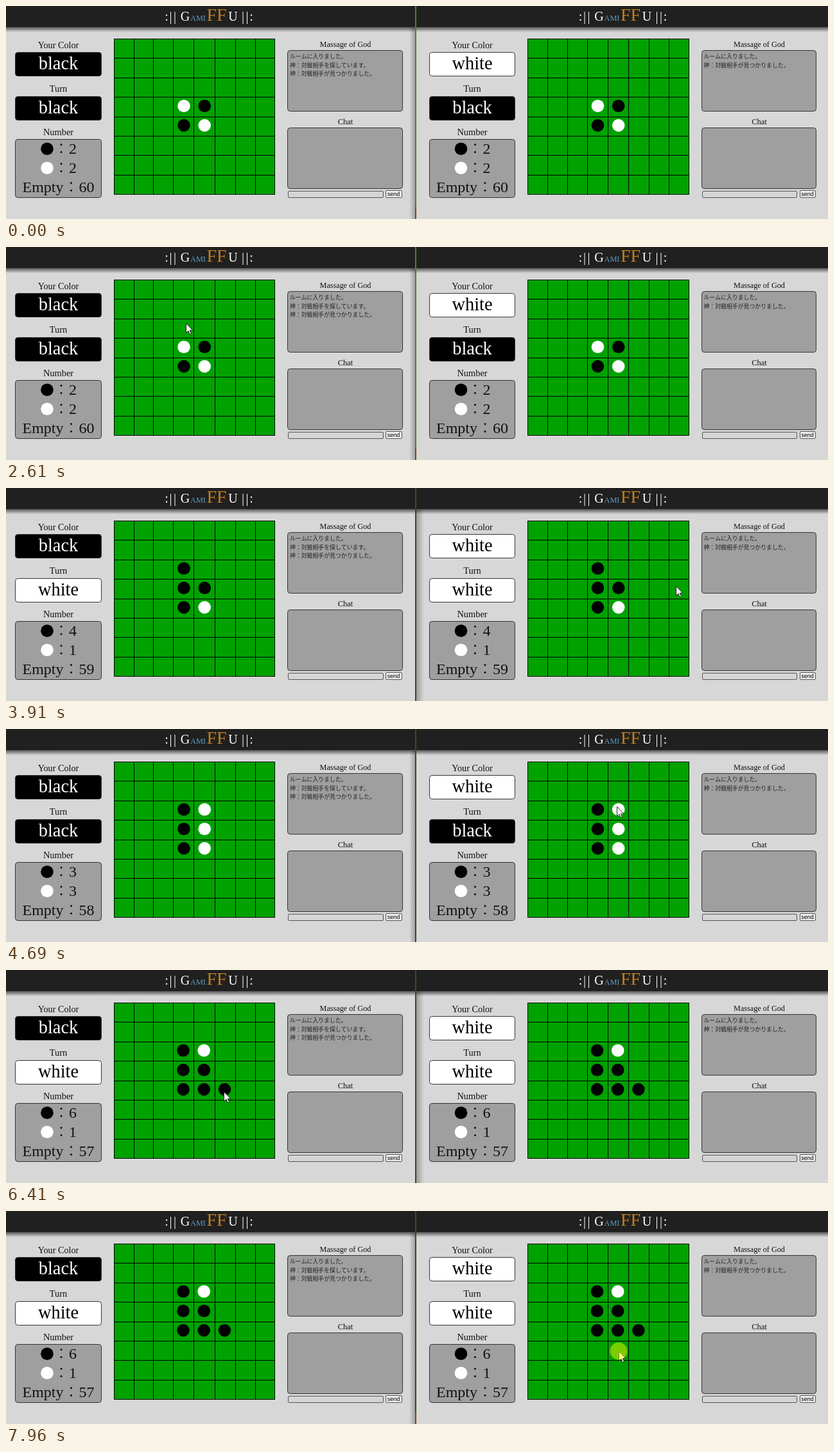
Recreate the animation shown at these times as an HTML page with a canvas. Size 1280x333 px, loop 8000 ms.

```html
<!DOCTYPE html>
<html lang="ja">
<head>
<meta charset="utf-8">
<style>
  html, body { margin: 0; width: 100%; height: 100%; overflow: hidden; background: #d7d7d7; }
  canvas { display: block; }
</style>
</head>
<body>
<canvas id="stage" width="1280" height="333"></canvas>
<script>
const ctx = document.getElementById('stage').getContext('2d');
const LOOP = 8000;
const STEP = 77;
const SERIF = '"Liberation Serif", "Noto Serif CJK JP", "Noto Sans CJK JP", serif';
const SANS = '"Noto Sans CJK JP", "Noto Sans CJK", sans-serif';

// Each click puts a disc on the board a moment later.
const plays = [
  { click: 2920, placed: 2990, color: 'black', col: 3, row: 2 },
  { click: 4630, placed: 4690, color: 'white', col: 4, row: 2 },
  { click: 6350, placed: 6410, color: 'black', col: 5, row: 4 },
  { click: 7960, placed: LOOP, color: 'white', col: 4, row: 5 },
];

// Cursor stops; each glide starts where the last one ended.
const entry = { x: 218, y: 333 };
const glides = [
  { start: 1470, end: 2220, x: 249, y: 125 },
  { start: 2300, end: 2610, x: 280, y: 119 },
  { start: 3300, end: 3760, x: 1060, y: 159 },
  { start: 3840, end: 4380, x: 951, y: 121 },
  { start: 5010, end: 5850, x: 335, y: 181 },
  { start: 5930, end: 6180, x: 339, y: 190 },
  { start: 6580, end: 6650, x: 350, y: 167 },
  { start: 6730, end: 7340, x: 944, y: 225 },
  { start: 7410, end: 7570, x: 954, y: 219 },
];

const other = color => color === 'black' ? 'white' : 'black';

function place(cells, { color, col, row }) {
  cells[row][col] = color;
  for (let dx = -1; dx <= 1; dx++) for (let dy = -1; dy <= 1; dy++) {
    const at = n => cells[row + dy * n]?.[col + dx * n];
    let n = 1;
    while (at(n) === other(color)) n++;
    if (at(n) === color) while (--n > 0) cells[row + dy * n][col + dx * n] = color;
  }
}

function gameAt(t) {
  const cells = Array.from({ length: 8 }, () => Array(8).fill(null));
  cells[3][3] = cells[4][4] = 'white';
  cells[3][4] = cells[4][3] = 'black';
  let turn = 'black';
  for (const play of plays.filter(p => t >= p.placed)) {
    place(cells, play);
    turn = other(play.color);
  }
  return { cells, turn };
}

function text(str, x, y, size, color = '#111', align = 'center', family = SERIF) {
  ctx.font = `${size}px ${family}`;
  ctx.fillStyle = color;
  ctx.textAlign = align;
  ctx.fillText(str, x, y);
}

function box(x, y, right, bottom, fill, radius = 4, border = '#333') {
  const left = Math.round(x);
  ctx.beginPath();
  ctx.roundRect(left + .5, y + .5, Math.floor(right) - left, bottom - y, radius);
  ctx.fillStyle = fill;
  ctx.fill();
  ctx.strokeStyle = border;
  ctx.lineWidth = 1;
  ctx.stroke();
}

function disc(x, y, color, radius = 9.8) {
  ctx.beginPath();
  ctx.arc(x, y, radius, 0, Math.PI * 2);
  ctx.fillStyle = color;
  ctx.fill();
}

function shade(x0, y0, x1, y1, alpha, x, y, w, h) {
  const gradient = ctx.createLinearGradient(x0, y0, x1, y1);
  gradient.addColorStop(0, `rgba(0,0,0,${alpha})`);
  gradient.addColorStop(1, 'rgba(0,0,0,0)');
  ctx.fillStyle = gradient;
  ctx.fillRect(x, y, w, h);
}

function drawTitle(x) {
  const center = x + 316;
  for (const side of [-1, 1]) {
    text(':', center + side * 66, 23, 20, '#fff');
    text('|', center + side * 59.5, 23, 20, '#fff');
    text('|', center + side * 53, 23, 20, '#fff');
  }
  text('G', x + 279, 23, 20, '#fff');
  text('AMI', x + 299, 23, 12.3, '#5b9cc4');
  text('FF', x + 328, 23, 28, '#c17f1c');
  text('U', x + 353.5, 23, 20, '#fff');
}

function drawBadge(x, y, color) {
  box(x + 14, y, x + 148, y + 37, color);
  text(color, x + 81.5, y + 27, 28.4, other(color));
}

function drawBoard(x, cells) {
  const wide = col => col >= 3 && col <= 5;
  const edges = [x + 168.2];
  for (let col = 0; col < 8; col++) edges.push(edges[col] + (wide(col) ? 32.2 : 30.84));
  const lines = edges.map(Math.floor);
  const left = lines[0], width = lines[8] - left + 1;

  ctx.fillStyle = '#00a200';
  ctx.fillRect(left, 51, width, 244);
  ctx.fillStyle = '#000';
  for (let i = 0; i <= 8; i++) {
    ctx.fillRect(lines[i], 51, 1, 244);
    ctx.fillRect(left, Math.round(51 + 30.4 * i), width, 1);
  }
  // The discs move over by a pixel once a third column is in use.
  const firstX = x + (cells.some(row => row[5]) ? 276 : 277);
  cells.forEach((row, r) => row.forEach((color, c) => {
    if (color) disc(firstX + 32.2 * (c - 3), 156.2 + 30.4 * (r - 3), color);
  }));
}

function drawPage(x, color, messages, { cells, turn }) {
  drawTitle(x);

  text('Your Color', x + 81.5, 66, 14.2);
  drawBadge(x, 72, color);
  text('Turn', x + 81.5, 134, 14.4);
  drawBadge(x, 141, turn);

  const count = wanted => cells.flat().filter(cell => cell === wanted).length;
  text('Number', x + 81.5, 202, 14.4);
  box(x + 14, 208, x + 148, 299, '#9f9f9f');
  ['black', 'white'].forEach((kind, i) => {
    disc(x + 64, 223.3 + 30 * i, kind);
    text('：' + count(kind), x + 74, 231 + 30 * i, 24, '#111', 'left');
  });
  text('Empty：' + count(null), x + 81.5, 291, 24);

  drawBoard(x, cells);

  text('Massage of God', x + 528.5, 64, 12.2);
  box(x + 438, 69, x + 617, 164, '#9f9f9f');
  messages.forEach((line, i) => text(line, x + 442, 82 + i * 13.5, 8.9, '#222', 'left', SANS));
  text('Chat', x + 528.5, 185, 12.5);
  box(x + 438, 190, x + 617, 285, '#9f9f9f');
  box(x + 439, 289, x + 587, 299, '#d5d5d5', 1.5, '#555');
  box(x + 591, 288, x + 616, 299, '#efefef', 1.5, '#555');
  text('send', x + 603.5, 297, 9, '#000', 'center', '"Liberation Sans", sans-serif');
}

// The window clicked last casts its shadow on the other one.
function drawSeam(t) {
  const lastClick = plays.filter(p => t >= p.click).pop();
  if (lastClick?.color === 'black') shade(639, 0, 651, 0, .28, 639, 34, 12, 299);
  else shade(638, 0, 628, 0, .28, 628, 34, 10, 299);
  ctx.fillStyle = lastClick ? '#2f5220' : '#527d3a';
  ctx.fillRect(637, 0, 2, 333);
  if (!lastClick || lastClick === plays[3]) {
    ctx.fillStyle = '#7a4a20';
    ctx.fillRect(637, 314, 2, 19);
  }
}

function cursorAt(t) {
  const index = glides.findLastIndex(glide => t >= glide.start);
  if (index < 0) return null;
  const from = glides[index - 1] || entry;
  const { start, end, x, y } = glides[index];
  const intervals = Math.round((end - start) / STEP);
  const passed = Math.floor((t - start) / (end - start) * intervals + .2);
  const p = Math.min(1, (passed + 1) / (intervals + 1));
  const eased = p * p * (3 - 2 * p);
  return [from.x + (x - from.x) * eased, from.y + (y - from.y) * eased].map(Math.round);
}

function drawCursor([x, y]) {
  const arrow = new Path2D('M.5 .5V15.2L3.9 12L6.3 17.6L8.6 16.6L6.2 11.2H10.7Z');
  ctx.save();
  ctx.translate(x, y);
  ctx.fillStyle = '#fff';
  ctx.fill(arrow);
  ctx.strokeStyle = '#111';
  ctx.lineWidth = .9;
  ctx.stroke(arrow);
  ctx.restore();
}

function draw(t) {
  const game = gameAt(t);
  const entered = 'ルームに入りました。';
  const searching = '神：対戦相手を探しています。';
  const found = '神：対戦相手が見つかりました。';
  ctx.fillStyle = '#d7d7d7';
  ctx.fillRect(0, 0, 1280, 333);
  ctx.fillStyle = '#202020';
  ctx.fillRect(0, 0, 1280, 33);
  shade(0, 33, 0, 41, .6, 0, 33, 1280, 8);
  drawPage(0, 'black', [entered, searching, found], game);
  drawPage(644.5, 'white', [entered, found], game);
  drawSeam(t);

  const cursor = cursorAt(t);
  if (!cursor) return;
  drawCursor(cursor);
  if (plays.some(p => t >= p.click && t < p.placed)) disc(...cursor, 'rgba(255,255,0,.48)', 13.5);
}

const began = performance.now();
function frame() {
  draw((performance.now() - began) % LOOP);
  requestAnimationFrame(frame);
}
frame();
</script>
</body>
</html>
```
